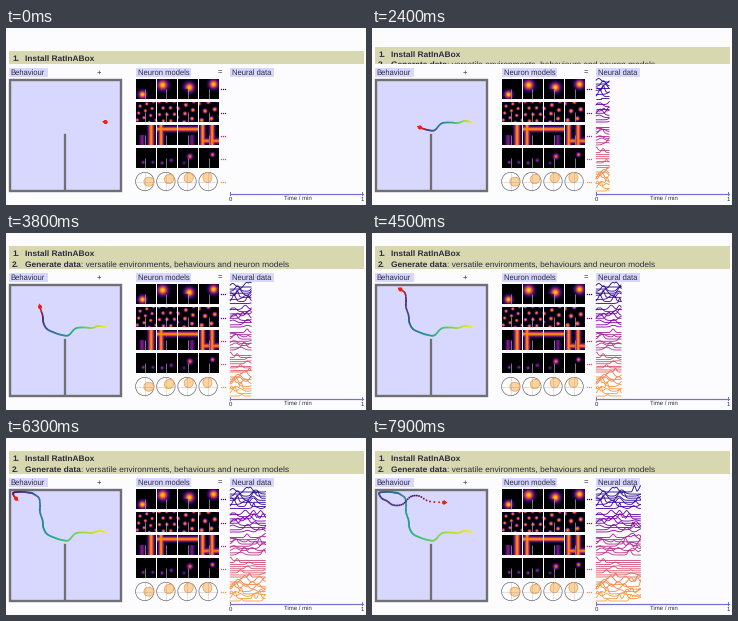
Recreate the animation shown at these times as a matplotlib script. Size 360 by 177 pixels, loop 8 s.

```python
import numpy as np
import matplotlib.pyplot as plt
from matplotlib.animation import FuncAnimation
from matplotlib.patches import Circle, Polygon, Rectangle

W, H, DPI = 360, 177, 100
FRAMES, STEP = 80, 100
PX = 72 / DPI
INK, LILAC, OLIVE, GREY, AXIS = "#2b2b40", "#d8d8ff", "#d8d8b0", "#707073", "#7373cf"
TILE_X = [129.5, 150.6, 171.7, 192.8]
ROW_Y = [51, 74, 97.3, 120.5]
SIZE = 19.6

plt.rcParams.update({"font.family": "Liberation Sans", "text.hinting": "none"})
rng = np.random.default_rng(4)
plasma, inferno, viridis = plt.cm.plasma, plt.cm.inferno, plt.cm.viridis

fig = plt.figure(figsize=(W / DPI, H / DPI), dpi=DPI, facecolor="#fcfcff")
ax = fig.add_axes([0, 0, 1, 1])
ax.axis("off")


def text(x, y, s, size, **kw):
    kw = {"color": INK, "va": "baseline", **kw}
    return ax.text(x, y, s, fontsize=size * PX, **kw)


def rect(x, y, w, h, color, **kw):
    return ax.add_patch(Rectangle((x, y), w, h, fc=color, **{"lw": 0, **kw}))


def line(xs, ys, color, width, **kw):
    return ax.plot(xs, ys, color=color, lw=width * PX, **kw)[0]


# --- header -----------------------------------------------------------
band = rect(3, 23, 355, 13, OLIVE)
header = [
    (text(x, 0, s, 8.4, weight=weight, clip_on=True), dy)
    for x, s, weight, dy in [
        (6, "1.", "bold", 0),
        (19, "Install RatInABox", "bold", 0),
        (6, "2.", "bold", 10.5),
        (19, "Generate data", "bold", 10.5),
        (75.2, ": versatile environments, behaviours and neuron models", "normal", 10.5),
    ]
]

for x, w, s in [(3, 39, "Behaviour"), (130, 55, "Neuron models"), (224, 44, "Neural data")]:
    rect(x, 39.5, w, 9.5, LILAC)
    text(x + 1.7, 46.8, s, 7.7)
text(93, 46.5, "+", 7.6, ha="center")
text(213.5, 46.5, "=", 7.6, ha="center")

# --- arena ------------------------------------------------------------
rect(4.2, 52.2, 110.8, 110.6, LILAC, ec=GREY, lw=2.4 * PX)
line([59.3, 59.3], [107, 162], GREY, 2.3)

# --- neuron models ----------------------------------------------------
X, Y = np.meshgrid(np.linspace(0, 1, 60), np.linspace(0, 1, 60))


def blob(cx, cy, s):
    return np.exp(-((X - cx) ** 2 + (Y - cy) ** 2) / (2 * s * s))


def bar(u, c, s=0.085):
    return np.exp(-((u - c) ** 2) / (2 * s * s))


def grid(period, turn, px, py):
    waves = 0
    for a in turn + np.arange(3) * np.pi / 3:
        waves = waves + np.cos(2 * np.pi / (period * 0.866)
                               * ((X - px) * np.cos(a) + (Y - py) * np.sin(a)))
    return np.clip((waves / 3 - 0.15) / 0.95, 0, 1)


place = [
    blob(0.32, 0.78, 0.13),
    blob(0.28, 0.3, 0.17),
    blob(0.57, 0.42, 0.16) * np.where((X < 0.5) & (Y > 0.5), 0.4, 1),
    blob(0.73, 0.26, 0.15),
]
grids = [grid(0.36, 0.2, 0.2, 0.2), grid(0.38, 0.5, 0.3, 0.3),
         grid(0.44, 0.1, 0.75, 0.4), grid(0.5, 0.35, 0.3, 0.45)]
left, low = X < 0.5, Y > 0.5
borders = [
    np.maximum(0.85 * bar(X, 0.76, 0.1), 0.4 * bar(X, 0.3) * low),
    np.maximum(0.85 * bar(Y, 0.2), 0.85 * bar(X, 0.2)),
    np.maximum(0.85 * bar(Y, 0.2), 0.35 * bar(X, 0.7) * low),
    np.maximum.reduce([0.85 * bar(X, 0.18), 0.85 * bar(X, 0.66),
                       0.8 * bar(Y, 0.8) * ((X > 0.66) | (left & (X > 0.18)))]),
]
objects = [
    0.6 * blob(0.36, 0.72, 0.05) + 0.5 * blob(0.85, 0.72, 0.05),
    0.6 * blob(0.25, 0.75, 0.05) + 0.5 * blob(0.72, 0.62, 0.06),
    0.8 * blob(0.6, 0.42, 0.09) + 0.4 * blob(0.3, 0.75, 0.05),
    0.85 * blob(0.68, 0.33, 0.07),
]

for y, row in zip(ROW_Y, [place, grids, borders, objects]):
    for x, rate in zip(TILE_X, row):
        ax.imshow(rate, cmap=inferno, vmin=0, vmax=1.1, aspect="auto",
                  extent=(x, x + SIZE, y + SIZE, y))
        mid = x + SIZE / 2
        line([mid, mid], [y + SIZE / 2, y + SIZE], "#a8a8a8", 0.7, solid_capstyle="butt")

phi = np.linspace(0, 2 * np.pi, 80)
for x, heading in zip(TILE_X, np.radians([-3, 38, 65, 100])):
    cx, cy, r = x + 9.3, 153.5, 9.2
    ax.add_patch(Circle((cx, cy), r, fc="white", ec="#555560", lw=0.6 * PX))
    petal = 9 * np.exp(1.2 * (np.cos(phi - heading) - 1))
    ax.add_patch(Polygon(np.c_[cx + petal * np.cos(phi), cy - petal * np.sin(phi)],
                         fc="#fdd3a0", ec="#f59a45", lw=0.7 * PX))
    for dx, dy in [(r, 0), (0, r)]:
        line([cx - dx, cx + dx], [cy - dy, cy + dy], "#8a8a94", 0.5, ls=(0, (2, 2)))

SHADES = [0.06, 0.24, 0.4, 0.55, 0.74]
for y, shade in zip([61, 84.5, 107.5, 130.5, 154], SHADES):
    line([215, 217, 219], [y] * 3, plasma(shade), 0, marker="o", ms=1.4 * PX, mew=0)

# --- neural data ------------------------------------------------------
SPEED = 5.7
times = np.linspace(0, 8, 161)
traces = []
for g, (top, bottom) in enumerate([(54, 70.5), (76.5, 94), (99.5, 117), (122.5, 139), (144, 163)]):
    bumps, height = [(3, 7), (3, 6.5), (3, 6), (1, 4), (5, 8)][g]
    for i, base in enumerate(np.linspace(top, bottom, 9)):
        rate = np.zeros_like(times)
        for _ in range(bumps):
            c, s, a = rng.uniform(-0.2, 8.5), rng.uniform(0.15, 0.55), rng.uniform(0.2, 1)
            rate = np.maximum(rate, a * height * np.exp(-((times - c) / s) ** 2 / 2))
        color = plasma(SHADES[g] + 0.012 * (i - 4))
        traces.append((line([], [], color, 0.85, solid_capstyle="butt"), base - rate))

line([224, 356.5], [165.6, 165.6], AXIS, 1.2)
for x, s in [(224.3, "0"), (356.2, "1")]:
    line([x, x], [163.8, 167], AXIS, 1)
    text(x, 173, s, 6, ha="center")
text(292, 171.8, "Time / min", 6, ha="center")

# --- trajectory -------------------------------------------------------
KEYS = np.array([
    (0, 99.5, 94), (.35, 92, 93), (.6, 86, 95), (.9, 79, 94.5), (1.3, 69.5, 95.5),
    (1.7, 62, 102.5), (2, 56, 102), (2.4, 48, 99.5), (2.75, 41, 96),
    (3.1, 37.5, 90), (3.5, 36.5, 82), (3.8, 34, 74), (4.1, 34, 66), (4.3, 33, 60),
    (4.5, 28.5, 56.5), (5, 22, 54.5), (5.6, 12, 54), (6, 7, 55.5), (6.3, 10, 60.5),
    (6.55, 15, 63), (6.8, 21, 67), (7.1, 31, 66), (7.35, 39, 58.5),
    (7.55, 47, 58), (7.75, 58, 63.5), (7.9, 72, 64.5),
])


def smooth(t, kt, kv):
    """Cubic Hermite curve through the keys."""
    slope = np.gradient(kv, kt)
    i = np.clip(np.searchsorted(kt, t, side="right") - 1, 0, len(kt) - 2)
    d = kt[i + 1] - kt[i]
    u = (t - kt[i]) / d
    return ((1 + 2 * u) * (1 - u) ** 2 * kv[i] + u * (1 - u) ** 2 * d * slope[i]
            + u * u * (3 - 2 * u) * kv[i + 1] + u * u * (u - 1) * d * slope[i + 1])


path_t = np.linspace(0, 7.9, 159)
path = np.c_[smooth(path_t, KEYS[:, 0], KEYS[:, 1]), smooth(path_t, KEYS[:, 0], KEYS[:, 2])]
RED = np.array([0.93, 0.12, 0.05, 1])

trail = ax.scatter([], [], s=(1.9 * PX) ** 2, lw=0, zorder=5)
body = ax.add_patch(Circle((0, 0), 2, fc=RED, lw=0, zorder=6))
nose = ax.add_patch(Polygon(np.zeros((3, 2)), fc=RED, lw=0, zorder=6))

ax.set(xlim=(0, W), ylim=(H, 0))


def draw(k):
    t = k * STEP / 1000

    rise = 10 * np.clip((t - 2) / 0.9, 0, 1)
    band.set_y(23 - rise)
    band.set_height(13 + rise)
    for label, dy in header:
        label.set_y(33 - rise + dy)
        label.set_clip_path(band)

    seen = times <= t + 1e-6
    for trace, ys in traces:
        trace.set_data(223.8 + SPEED * times[seen], ys[seen])

    n = 2 * k + 1
    age = t - path_t[:n]
    colors = viridis(1 - path_t[:n] / max(t, 0.05))
    heat = np.clip(1 - age / 0.4, 0, 1)[:, None]
    trail.set_offsets(path[:n])
    trail.set_facecolor(colors * (1 - heat) + RED * heat)

    head = path[n - 1]
    a = max(n - 2, 0)
    step = path[a + 1] - path[a]
    ahead = step / np.hypot(*step)
    side = np.array([-ahead[1], ahead[0]])
    body.center = head
    nose.set_xy([head + 3.6 * ahead, head + 2 * side, head - 2 * side])
    return []


anim = FuncAnimation(fig, draw, frames=FRAMES, interval=STEP, repeat=True,
                     repeat_delay=0, blit=False)
plt.show()
```
